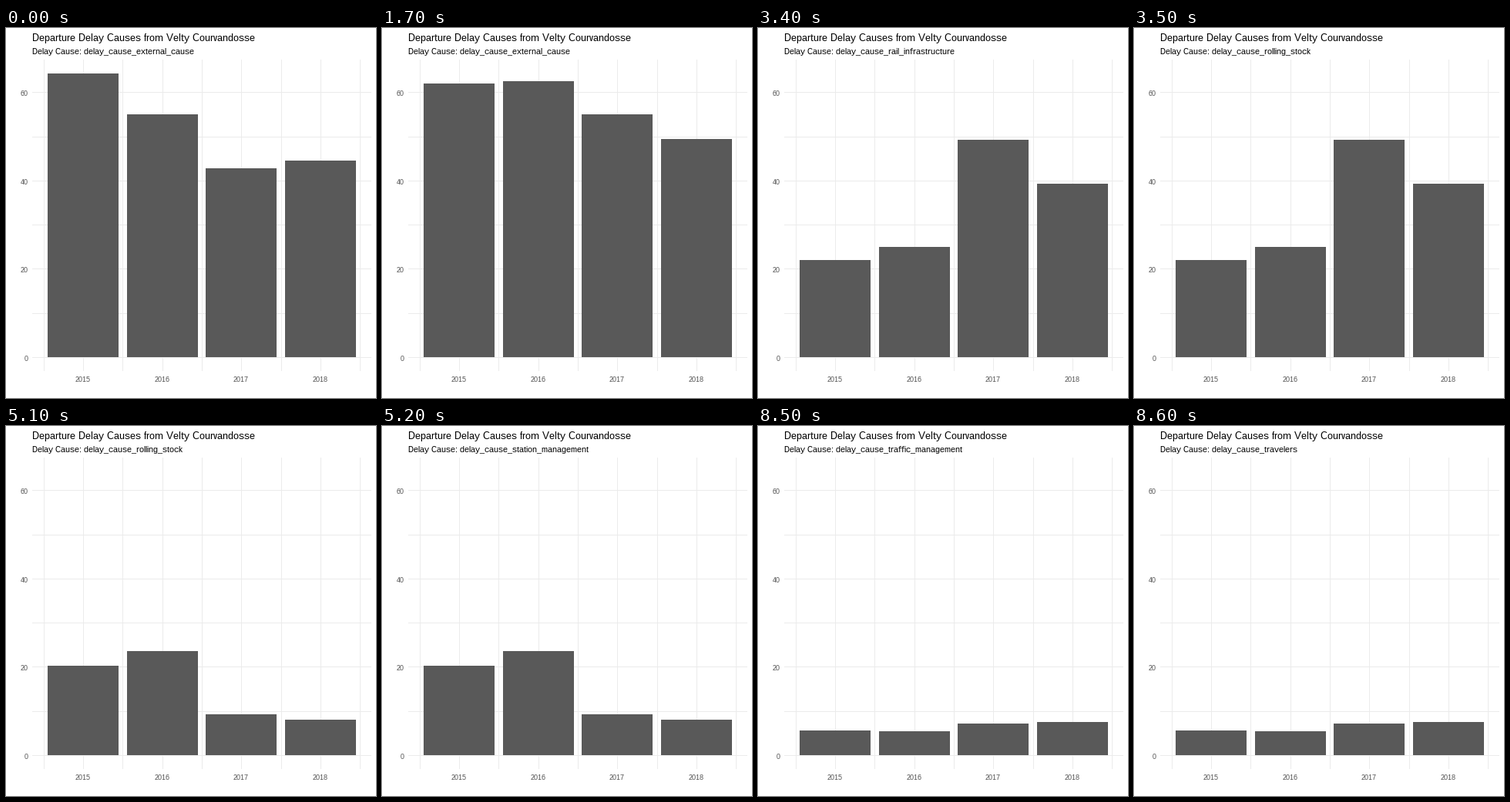
A matplotlib script for the animation above (10000 ms loop, 480 by 480 pixels).

```python
import matplotlib.pyplot as plt
from matplotlib.animation import FuncAnimation
from matplotlib.patches import Rectangle

SIZE, DPI = 480, 72
plt.rcParams.update({
    "font.family": "Liberation Sans",
    "text.hinting": "native",
    "text.hinting_factor": 1,
})

GRID, BAR, AXIS_TEXT = "#ebebeb", "#595959", "#4d4d4d"
LEFT, TOP, RIGHT, BOTTOM = 34, 41, 474, 445   # panel edges
BASE = 427                                    # row of the zero line
STEP_X, STEP_Y = 51.28, 57.26                 # half a year, ten units
FIRST_YEAR_X = 100.15

# cause and the top row of each year's bar
CAUSES = [
    ("external_cause", (59, 112, 182, 172)),
    ("rail_infrastructure", (72, 69, 112, 144)),
    ("rolling_stock", (301, 284, 145, 202)),
    ("station_management", (311, 292, 374, 381)),
    ("traffic_management", (323, 308, 262, 270)),
    ("travelers", (395, 396, 386, 384)),
]
FRAMES, INTERVAL = 100, 100
HOLD = 17   # frames per cause

fig = plt.figure(figsize=(SIZE / DPI, SIZE / DPI), dpi=DPI, facecolor="white")
ax = fig.add_axes([0, 0, 1, 1])
ax.set_xlim(0, SIZE)
ax.set_ylim(SIZE, 0)
ax.axis("off")


def box(x, y, w, h, color, z):
    patch = Rectangle((x, y), w, h, facecolor=color, linewidth=0,
                      antialiased=False, zorder=z)
    return ax.add_patch(patch)


def label(x, y, text, size, color="black", ha="left"):
    return ax.text(x, y, text, fontsize=size, color=color, ha=ha,
                   va="baseline", zorder=3)


for i in range(-1, 8):
    x = round(FIRST_YEAR_X + i * STEP_X)
    box(x, TOP, 1, BOTTOM - TOP, GRID, 1)
    if i % 2 == 0:
        label(x - 10, 459, str(2015 + i // 2), 9, AXIS_TEXT)

for i in range(7):
    y = round(BASE - i * STEP_Y)
    box(LEFT, y, RIGHT - LEFT, 1, GRID, 1)
    if i % 2 == 0:
        label(29, y + 5, str(10 * i), 9, AXIS_TEXT, "right")

bars = []
for i in range(4):
    start = 54 + i * 2 * STEP_X
    x0, x1 = round(start), round(start + 1.8 * STEP_X)
    bars.append(box(x0, BASE, x1 - x0, 0, BAR, 2))

label(34, 17, "Departure Delay Causes from Velty Courvandosse", 13)
subtitle = label(34, 34, "", 11)


def draw(frame):
    # the subtitle changes one frame after the bars
    tops = CAUSES[frame // HOLD][1]
    cause = CAUSES[max(frame - 1, 0) // HOLD][0]
    for bar, top in zip(bars, tops):
        bar.set_y(top)
        bar.set_height(BASE - top)
    subtitle.set_text(f"Delay Cause: delay_cause_{cause}")
    return [*bars, subtitle]


anim = FuncAnimation(fig, draw, frames=FRAMES, interval=INTERVAL,
                     repeat=True, repeat_delay=0, blit=False)
plt.show()
```
